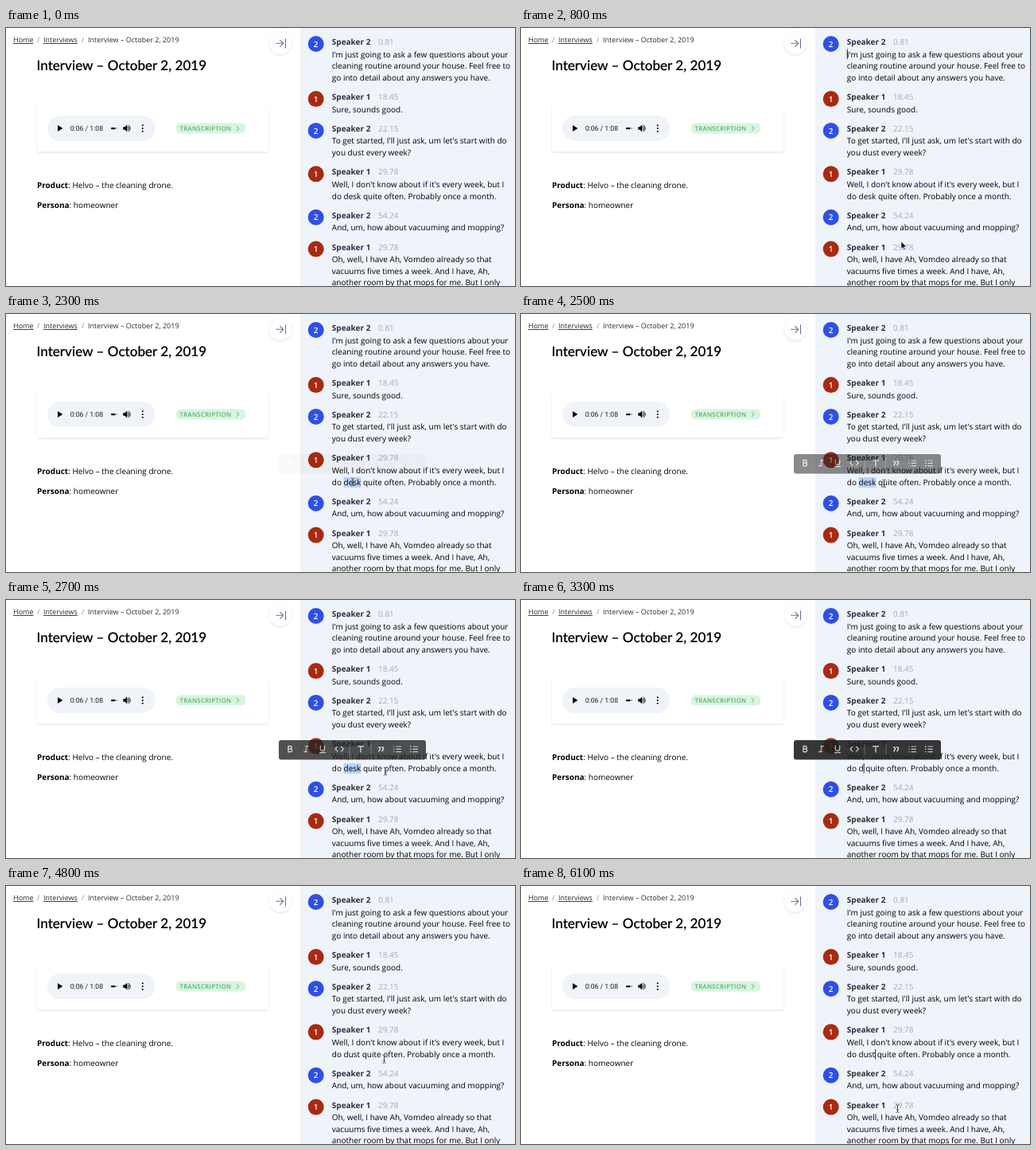
Recreate the animation shown at these times as an HTML page. Size 640 px wide and 324 px high, loop 6200 ms.

```html
<!DOCTYPE html>
<html lang="en">
<head>
<meta charset="utf-8">
<title>Interview transcript</title>
<style>
  html, body { margin: 0; width: 100%; height: 100%; overflow: hidden; background: #fff; }
  svg { display: block; width: 100vw; height: 100vh; }
  text { font: 10px "Open Sans", sans-serif; fill: #000; text-rendering: geometricPrecision; white-space: pre; }
  .bold { font-weight: 700; }
  .label { font-weight: 700; fill: #303036; }
  .time { fill: #a9abb0; }
  .num { font-weight: 600; fill: #fff; text-anchor: middle; }
  .crumb { font-size: 9px; fill: #2c2c33; }
  .slash { fill: #8a8a92; }
  .link { text-decoration: underline; }
  .title { font: 500 17.1px Lato, sans-serif; fill: #000; stroke: #000; stroke-width: .2; }
  .clock { font: 8.7px Roboto, sans-serif; fill: #1c1e22; }
  .pill { font-size: 7.8px; font-weight: 600; letter-spacing: .3px; fill: #55b272; }
  .card { filter: drop-shadow(0 1.5px 1.2px rgba(0, 0, 0, .12)); }
  .button { filter: drop-shadow(0 1.5px 1.5px rgba(30, 40, 80, .13)); }
  .line { fill: none; stroke-linecap: round; stroke-linejoin: round; }
</style>
</head>
<body>
<svg viewBox="0 0 640 324">
  <defs>
    <path id="ibeam" d="M-1.800 -5Q0 -5 0 -3.600V3.600Q0 5 -1.800 5M1.800 -5Q0 -5 0 -3.600V3.600Q0 5 1.800 5M-1 1.600H1"/>
  </defs>
  <rect width="640" height="324" fill="#fff"/>
  <rect x="370" width="270" height="324" fill="#eff3fa"/>

  <text class="crumb link" x="9" y="18">Home</text>
  <text class="crumb slash" x="39" y="18">/</text>
  <text class="crumb link" x="47" y="18">Interviews</text>
  <text class="crumb slash" x="95" y="18">/</text>
  <text class="crumb" x="103" y="18">Interview – October 2, 2019</text>
  <text class="title" x="38.500" y="52.500">Interview – October 2, 2019</text>

  <g class="button"><circle cx="345" cy="19" r="14" fill="#fff"/></g>
  <path class="line" d="M339.700 19.300H348.500M344.800 15.300L348.700 19.300L344.800 23.300M351.500 13.700V24.900" stroke="#666f9c" stroke-width="1.100"/>

  <g class="card"><path d="M39 100H330V152.500Q330 155.500 327 155.500H42Q39 155.500 39 152.500Z" fill="#fff"/></g>
  <rect x="39" y="96" width="291" height="6" fill="#fff"/>
  <rect x="52" y="110" width="135.500" height="32" rx="16" fill="#f0f3f8"/>
  <path d="M65 122L71.300 126L65 130Z"/>
  <text class="clock" x="80.700" y="129.200">0:06 / 1:08</text>
  <rect x="132" y="125" width="8.500" height="2" rx="1" fill="#b5b8be"/>
  <rect x="132" y="124.900" width="5.500" height="2.300" rx="1.100"/>
  <path d="M147.300 124.300H149.500L152.300 121.500V130.500L149.500 127.700H147.300Z"/>
  <path class="line" d="M153.700 124.300Q155 126 153.700 127.700M154 122.200Q158.800 126 154 129.800" stroke="#000"/>
  <g><circle cx="171.800" cy="122.300" r="1.050"/><circle cx="171.800" cy="126" r="1.050"/><circle cx="171.800" cy="129.700" r="1.050"/></g>

  <rect x="214" y="119.500" width="87" height="13" rx="5" fill="#d9f4df"/>
  <text class="pill" x="218.500" y="128.900">TRANSCRIPTION</text>
  <path class="line" d="M290.300 123.400L293 126.100L290.300 128.800" stroke="#55b272"/>

  <text x="39" y="201"><tspan class="bold">Product</tspan>: Helvo – the cleaning drone.</text>
  <text x="39" y="226"><tspan class="bold">Persona</tspan>: homeowner</text>

  <rect id="mark" y="205" height="13" fill="#b7d2fb"/>
  <g id="talk"></g>
  <rect id="caret" width=".9" height="12.500" fill="#111"/>

  <g id="bar" opacity="0">
    <rect x="343" y="176" width="185" height="24.500" rx="3" fill="#222" fill-opacity=".9"/>
    <g class="line" stroke="#c4c4c4" stroke-width="1.200">
      <path d="M355 183.500V190.700H357.500Q359.600 190.700 359.600 188.700Q359.600 187 357.500 187H355H357.300Q359.100 187 359.100 185.200Q359.100 183.500 357.300 183.500Z" stroke-width="1.500"/>
      <path d="M376.500 183.500H380.500M374.500 190.700H378.500M378.500 183.500L376.500 190.700"/>
      <path d="M395.300 183V186.600Q395.300 189.500 398 189.500Q400.700 189.500 400.700 186.600V183M394.500 191.600H401.500"/>
      <path d="M417 184.300L414 187.200L417 190.100M421.500 184.300L424.500 187.200L421.500 190.100"/>
      <path d="M442.500 183.800H449.500M446 183.800V191" stroke-width="1.500"/>
      <path d="M468.500 185H470.300V187.500L469 189.700M472.500 185H474.300V187.500L473 189.700" stroke-width="1.700"/>
      <path d="M491 184H496.500M491 187.300H496.500M491 190.600H496.500M487.700 184H488M487.700 187.300H488M487.700 190.600H488"/>
      <path d="M512 184H517.500M512 187.300H517.500M512 190.600H517.500M508.700 183.300V184.700M508.400 187.300H509.200M508.400 190.600H509.200"/>
    </g>
    <path d="M432 181V194M459 181V194" stroke="#777" stroke-width=".8"/>
  </g>

  <path id="arrow" d="M0 0V9.500L2.200 7.500L3.700 10.900L5.200 10.200L3.700 6.900H6.700Z" fill="#000" stroke="#fff" stroke-width=".7"/>
  <g id="beam" class="line">
    <use href="#ibeam" stroke="#fff" stroke-width="1.600" opacity=".6"/>
    <use href="#ibeam" stroke="#3a3a3a" stroke-width=".8"/>
  </g>
</svg>
<script>
const LOOP = 6200, LEFT = 409.8, LEAD = 14.65;
const $ = id => document.getElementById(id);

const talk = [
  [2, '0.81', "I'm just going to ask a few questions about your",
    'cleaning routine around your house. Feel free to', 'go into detail about any answers you have.'],
  [1, '18.45', 'Sure, sounds good.'],
  [2, '22.15', "To get started, I'll just ask, um let's start with do", 'you dust every week?'],
  [1, '29.78', "Well, I don't know about if it's every week, but I", 'do desk quite often. Probably once a month.'],
  [2, '54.24', 'And, um, how about vacuuming and mopping?'],
  [1, '29.78', 'Oh, well, I have Ah, Vomdeo already so that',
    'vacuums five times a week. And I have, Ah,', 'another room by that mops for me. But I only']
];

function add(tag, attrs, text = '') {
  const el = document.createElementNS('http://www.w3.org/2000/svg', tag);
  for (const key in attrs) el.setAttribute(key, attrs[key]);
  el.textContent = text;
  return $('talk').appendChild(el);
}

let y = 21, edited;
for (const [who, time, ...lines] of talk) {
  add('circle', { cx: 389.7, cy: y - 1, r: 10, fill: who === 1 ? '#a82a12' : '#2f4fe6' });
  add('text', { class: 'num', x: 389.7, y: y + 2.6 }, who);
  add('text', { class: 'label', x: LEFT, y }, 'Speaker ' + who);
  add('text', { class: 'time', x: 468, y }, time);
  lines.forEach((line, i) => {
    const el = add('text', { x: LEFT, y: y + 15.5 + i * LEAD }, line);
    if (line.startsWith('do desk')) edited = el;
  });
  y += 25.15 + lines.length * LEAD;
}

// [start, word]
const typing = [[0, 'desk'], [3300, 'd'], [3500, 'du'], [3800, 'dus'], [3900, 'dust']];
// [time, x, y]
const path = [[200, 546, 326], [800, 478, 268], [1400, 437, 213], [1750, 437, 213], [2050, 436, 211],
  [2350, 436, 211], [2650, 477, 215], [4400, 477, 215], [4700, 475.5, 217.5], [5000, 475.5, 217.5], [5700, 473.5, 279.5]];

const within = (t, a, b) => t >= a && t < b;
const clamp = v => Math.min(1, Math.max(0, v));
const smooth = v => v * v * (3 - 2 * v);
const show = (el, on) => el.setAttribute('visibility', on ? 'visible' : 'hidden');

function pointer(t) {
  const i = path.findIndex(p => p[0] > t);
  if (i === 0) return path[0].slice(1);
  if (i < 0) return path[path.length - 1].slice(1);
  const [t0, x0, y0] = path[i - 1], [t1, x1, y1] = path[i];
  const k = smooth((t - t0) / (t1 - t0));
  return [x0 + (x1 - x0) * k, y0 + (y1 - y0) * k];
}

function draw(t) {
  const word = typing.filter(s => s[0] <= t).pop()[1];
  const line = `do ${word} quite often. Probably once a month.`;
  if (edited.textContent !== line) edited.textContent = line;
  const start = LEFT + edited.getSubStringLength(0, 3);
  const end = start + edited.getSubStringLength(3, word.length);

  $('mark').setAttribute('x', start);
  $('mark').setAttribute('width', end - start);
  show($('mark'), within(t, 2150, 3300));

  const typed = t >= 3300;
  $('caret').setAttribute('x', typed ? end : LEFT);
  $('caret').setAttribute('y', typed ? 205 : 26.5);
  const blink = Math.floor((t - 3900) / 500) % 2 === 0;
  show($('caret'), typed ? t < 3900 || blink : within(t, 500, 1000) || within(t, 1500, 2100));

  const fadeIn = 1 - (1 - clamp((t - 2295) / 820)) ** 3;
  $('bar').setAttribute('opacity', fadeIn * (1 - clamp((t - 3300) / 200)));

  const [px, py] = pointer(t);
  const move = `translate(${px} ${py})`;
  const isArrow = t < 1800;
  $('arrow').setAttribute('transform', move);
  $('beam').setAttribute('transform', move);
  show($('arrow'), isArrow && t >= 200);
  show($('beam'), !isArrow && !within(t, 3300, 4400));
}

const begin = performance.now();
function tick() {
  draw((performance.now() - begin) % LOOP);
  requestAnimationFrame(tick);
}
tick();
</script>
</body>
</html>
```
